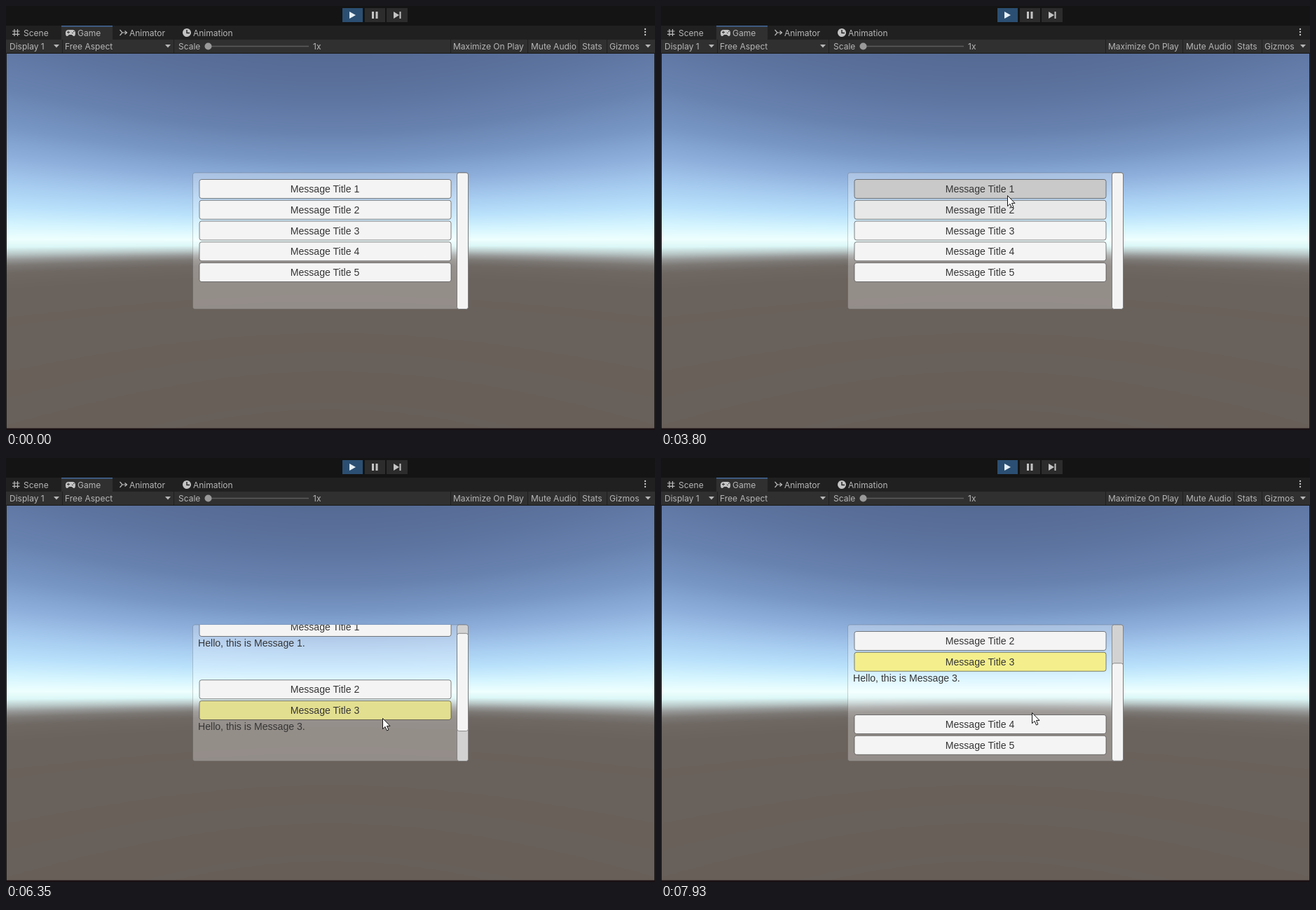
Recreate the animation shown at these times as an HTML page with a canvas. Size 926 by 605 pixels, loop 8000 ms.

```html
<!DOCTYPE html>
<html lang="en">
<head>
<meta charset="utf-8">
<title>Message list</title>
<style>
  html, body { margin: 0; width: 100%; height: 100%; overflow: hidden; background: #141414; }
  canvas, svg { position: absolute; left: 0; top: 0; display: block; }
  .ui text { font: 12px Inter, Roboto, sans-serif; fill: #b6b6b6; }
  .list text { font: 14.1px "Liberation Sans", Arial, sans-serif; fill: #363636; }
</style>
</head>
<body>
<canvas id="sky" width="926" height="605"></canvas>
<svg width="926" height="605" viewBox="0 0 926 605">
  <defs><clipPath id="view"><rect x="266" y="238" width="377" height="194.5" rx="3"/></clipPath></defs>
  <g class="ui">
    <path fill="#141414" d="M0 0H926V28H0Z"/>
    <path fill="#202020" d="M0 28H926V48H0Z"/>
    <path fill="#303030" d="M0 48H926V67H0ZM79 28H152V48H79Z"/>
    <path fill="#446a9c" d="M79 28H152V29.5H79Z"/>
    <path fill="#191919" d="M0 67H926V68H0ZM0 68H1V605H0ZM925 68H926V605H925Z"/>
    <path fill="#1a1114" d="M0 602.5H926V605H0Z"/>
    <path fill="#2b4f72" d="M480 3H509V23H480Z"/>
    <path fill="#2c2c2c" d="M512 3H541V23H512ZM543 3H573V23H543Z"/>
    <path fill="#e6eff7" d="M490 8L499 13 490 18Z"/>
    <path fill="#c4c4c4" d="M522 8H525V18H522ZM527.5 8H530.5V18H527.5ZM553 8L561 13 553 18ZM561.5 8H563.5V18H561.5Z"/>
    <path stroke="#1f1f1f" d="M80.5 48V67M239.5 48V67M634.5 48V67M744.5 48V67M817.5 48V67M857.5 48V67"/>
    <g fill="none" stroke="#bcbcbc" stroke-width="1.2">
      <path d="M12 33V43M16.5 33V43M9 36H19.5M9 40.3H19.5"/>
      <path d="M162.5 34L166 38 162.5 42M166 38H172M169.5 35.5L172.5 38 169.5 40.5"/>
    </g>
    <path fill="#c4c4c4" d="M88.5 34H95.5A4 4 0 0 1 99 38.5C99 42 98 43.5 96.5 43 95 42.5 94.5 41 93.5 41H90.5C89.5 41 89 42.5 87.5 43 86 43.5 85 42 85 38.5A4 4 0 0 1 88.5 34Z"/>
    <path stroke="#303030" d="M87 37.5H91M89 35.5V39.5M94 38.5H95.5M96 36.5H97.5"/>
    <circle cx="258" cy="38" r="6" fill="#c4c4c4"/>
    <path fill="none" stroke="#202020" stroke-width="1.4" d="M258 34V38.5H262"/>
    <g fill="#c4c4c4"><circle cx="912" cy="33" r="1.2"/><circle cx="912" cy="37" r="1.2"/><circle cx="912" cy="41" r="1.2"/></g>
    <path fill="#b6b6b6" d="M68 55H76L72 59.5ZM227 55H235L231 59.5ZM912 55H920L916 59.5Z"/>
    <path stroke="#5c5c5c" stroke-width="1.5" d="M288 57.5H432"/>
    <circle cx="288.5" cy="57.5" r="5" fill="#999"/>
    <g id="labels"></g>
  </g>
  <rect x="266.5" y="238" width="393" height="194.5" rx="3" fill="#fff" fill-opacity=".28" stroke="#444" stroke-opacity=".25"/>
  <g class="list" clip-path="url(#view)"><g id="rows"></g></g>
  <rect x="643.5" y="238" width="16" height="194.5" rx="3" fill="#d2d2d2" stroke="#707070" stroke-opacity=".7"/>
  <rect id="thumb" x="643.5" width="16" rx="3" fill="#f4f4f4" stroke="#606060" stroke-opacity=".7"/>
  <g id="cursor">
    <path d="M.5 .5V15.7L4 12.4 6.5 18 8.9 17 6.5 11.4H11Z" fill="#fff" stroke="#151515"/>
    <circle id="busy" cx="13" cy="1.5" r="5.6" fill="#b9dcf5" stroke="#2c8ee2" stroke-width="4.4"/>
  </g>
</svg>
<script>
const $ = id => document.getElementById(id);
const LOOP = 8000, TOP = 247.5, PITCH = 29.75, BODY = 59.5, VIEW = 195;

// Sky: colour depends on the viewing angle, given as height on the middle column
const sky = [
  [68, 0x556a93], [130, 0x5d74a0], [180, 0x6882af], [220, 0x7897c5], [250, 0x8eafdb],
  [275, 0xa4c9ee], [300, 0xb9e1fb], [318, 0xd4f4fe], [333, 0xeefffe], [341, 0xdcf7f7],
  [348, 0xb9c8c7], [354, 0x959796], [360, 0x7b7773], [368, 0x6e6762], [385, 0x6a625c], [602, 0x675e58]
];
const rgb = c => [c >> 16, c >> 8 & 255, c & 255];

function skyColor(y) {
  let i = 1;
  while (i < sky.length - 1 && sky[i][0] < y) i++;
  const [y0, c0] = sky[i - 1], [y1, c1] = sky[i];
  const f = Math.min(1, Math.max(0, (y - y0) / (y1 - y0))), b = rgb(c1);
  return rgb(c0).map((v, k) => v + (b[k] - v) * f);
}

function paintSky() {
  const ctx = $("sky").getContext("2d"), img = ctx.createImageData(926, 535);
  for (let y = 0, p = 0; y < 535; y++)
    for (let x = 0; x < 926; x++, p += 4) {
      const c = skyColor(335 + (y - 267) * 463 / Math.hypot(463, x - 463));
      for (let k = 0; k < 3; k++) img.data[p + k] = c[k];
      img.data[p + 3] = 255;
    }
  ctx.putImageData(img, 0, 68);
}

function add(parent, tag, attrs, text) {
  const el = document.createElementNS("http://www.w3.org/2000/svg", tag);
  for (const k in attrs) el.setAttribute(k, attrs[k]);
  if (text) el.textContent = text;
  return parent.appendChild(el);
}

[[25, 43, "Scene"], [102, 43, "Game"], [176, 43, "Animator"], [267, 43, "Animation"],
 [5, 62, "Display 1"], [84, 62, "Free Aspect"], [246, 62, "Scale"], [438, 62, "1x"],
 [638, 62, "Maximize On Play"], [749, 62, "Mute Audio"], [822, 62, "Stats"], [861, 62, "Gizmos"]
].forEach(([x, y, s]) => add($("labels"), "text", { x, y }, s));

const rows = [1, 2, 3, 4, 5].map(n => {
  const g = add($("rows"), "g", {});
  const box = add(g, "rect", { x: 276, y: 0, width: 359, height: 27, rx: 3, stroke: "#333", "stroke-opacity": .6 });
  add(g, "text", { x: 455, y: 18.5, "text-anchor": "middle" }, `Message Title ${n}`);
  const body = add(g, "text", { x: 274, y: 41.3 }, `Hello, this is Message ${n}.`);
  return { g, box, body };
});

// Bursts of change: start, end, number of steps
const bursts = [
  [470, 1160, 10], [1290, 1920, 10], [2120, 2680, 9], [2820, 3310, 8], [3450, 4010, 9], [4410, 4620, 4],
  [4880, 5650, 12], [5790, 6000, 4], [6210, 6630, 7], [6770, 7510, 9], [7580, 7930, 6]
];
const path = [
  [470, 645, 566], [700, 600, 505], [900, 568, 457], [1160, 541, 428], [1290, 540, 430], [1920, 549, 448],
  [2120, 547, 444], [2400, 528, 403], [2680, 520, 385], [2820, 519, 380], [3310, 507, 328], [3450, 506, 322],
  [3640, 499, 298], [3735, 495, 274.5], [3800, 494, 270], [4010, 491, 262], [4620, 491, 262], [4880, 493, 265],
  [5090, 515, 286], [5370, 526, 315], [5650, 535, 339], [5790, 535, 341], [6000, 537, 371], [6770, 537, 371],
  [6955, 535, 369], [7510, 535, 369], [7720, 530, 363], [7930, 529, 363]
];
const scrolls = [[5370, 20], [6770, 40], [6860, 60], [7580, 80], [7720, 89.25]];
const clicks = [{ row: 0, down: 4410, up: 4480 }, { row: 2, down: 6210, up: 6275 }];

const NORMAL = rgb(0xf4f4f4), HOVER = rgb(0xb6b6b6), PRESSED = rgb(0xa0a0a0), SELECTED = rgb(0xf4ef8c);

function snap(t) {
  let out = 0;
  for (const [a, b, n] of bursts) {
    if (t < a) break;
    const step = (b - a) / (n - 1);
    out = Math.min(b, a + Math.floor((t - a) / step + 1e-6) * step);
  }
  return out;
}

function cursorAt(t) {
  if (t < path[0][0]) return [-99, -99];
  const i = path.findIndex(p => p[0] > t);
  if (i < 0) return path[path.length - 1].slice(1);
  const [t0, x0, y0] = path[i - 1], [t1, x1, y1] = path[i], f = (t - t0) / (t1 - t0);
  return [x0 + (x1 - x0) * f, y0 + (y1 - y0) * f];
}

const scrollAt = t => scrolls.reduce((s, [at, v]) => t >= at ? v : s, 0);
const isOpen = (i, t) => clicks.some(c => c.row === i && t >= c.up);

function rowTop(i, t) {
  const above = clicks.filter(c => c.row < i && t >= c.up).length;
  return TOP + i * PITCH + above * BODY - scrollAt(t);
}

function stateColor(i, t) {
  const last = clicks.filter(c => t >= c.down).pop();
  if (last && last.row === i) return t < last.up ? PRESSED : SELECTED;
  const [x, y] = cursorAt(t), top = rowTop(i, t);
  return x > 276 && x < 635 && y >= top && y < top + 27 ? HOVER : NORMAL;
}

// Mean over the last 100 ms gives a linear cross-fade
function fadedColor(i, t) {
  const sum = [0, 0, 0];
  for (let k = 0; k < 10; k++) stateColor(i, t - k * 10).forEach((v, c) => sum[c] += v / 10);
  return `rgb(${sum.map(Math.round)})`;
}

function draw(time) {
  const t = snap(time);
  rows.forEach(({ g, box, body }, i) => {
    g.setAttribute("transform", `translate(0 ${rowTop(i, t)})`);
    box.setAttribute("fill", fadedColor(i, t));
    body.setAttribute("visibility", isOpen(i, t) ? "visible" : "hidden");
  });
  const opened = clicks.filter(c => t >= c.up).length;
  const full = Math.max(VIEW, 165.75 + opened * BODY);
  $("thumb").setAttribute("y", 238 + 175 * scrollAt(t) / full);
  $("thumb").setAttribute("height", 19.5 + 175 * VIEW / full);
  const [x, y] = cursorAt(t);
  $("cursor").setAttribute("transform", `translate(${Math.round(x)} ${Math.round(y)})`);
  $("busy").setAttribute("visibility", t >= 5020 && t < 5300 ? "visible" : "hidden");
}

paintSky();
const start = performance.now();
function tick() {
  draw((performance.now() - start) % LOOP);
  requestAnimationFrame(tick);
}
tick();
</script>
</body>
</html>
```
